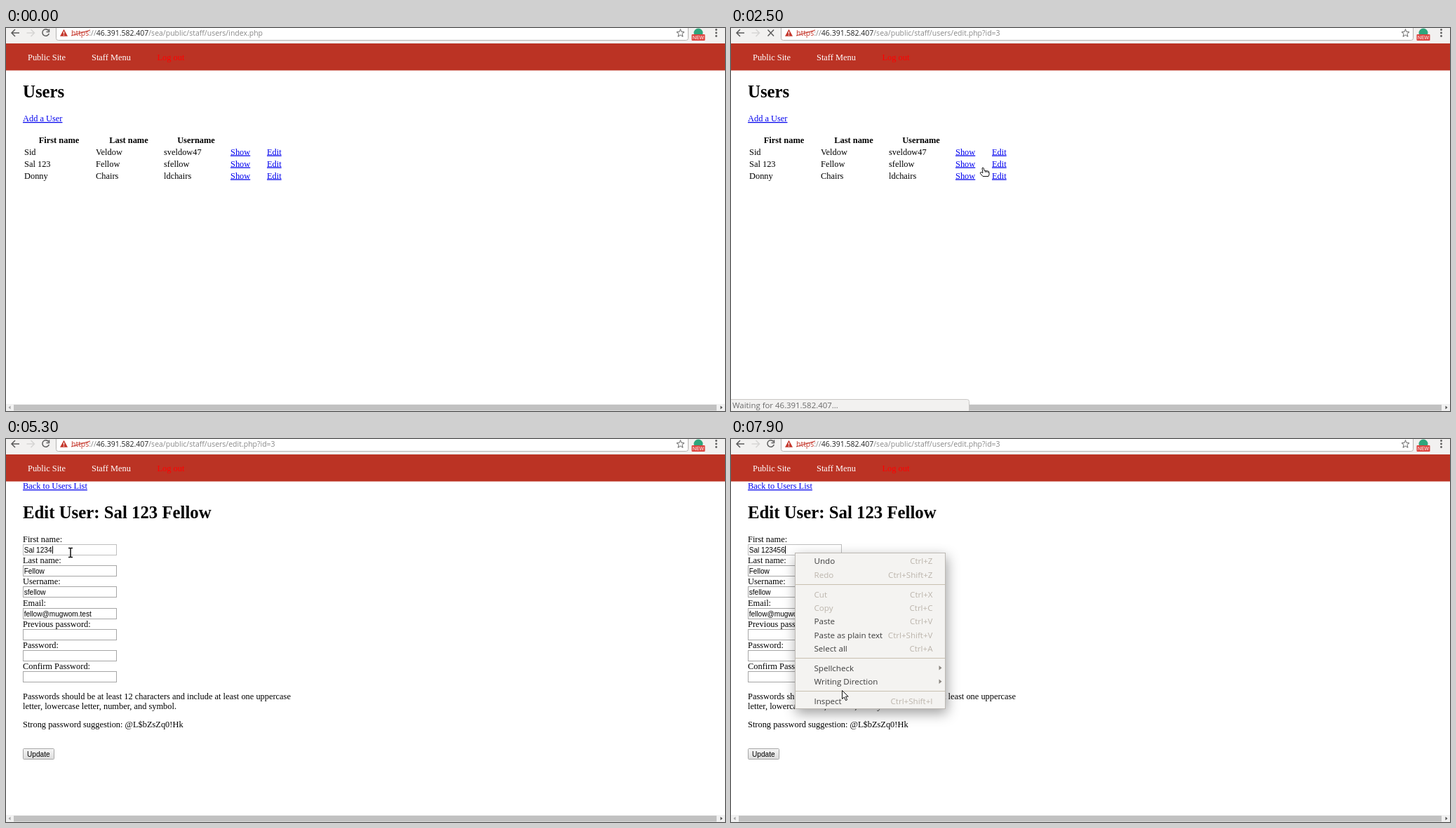
These frames come from a looping animation (1025x546 px, 8 s). An HTML page:

```html
<!DOCTYPE html>
<html lang="en">
<head>
<meta charset="utf-8">
<title>Edit user</title>
<style>
  html, body { margin: 0; width: 100%; height: 100%; overflow: hidden; background: #fff; }
  svg { display: block; }
  text { font: 12.4px "Liberation Serif", serif; white-space: pre; }
  .b { font-weight: bold; }
  .h { font-weight: bold; font-size: 24.8px; }
  .link { fill: #0000ee; text-decoration: underline; }
  .sans { font: 10.1px "Liberation Sans", sans-serif; }
  .url { font: 10.5px "Open Sans", sans-serif; }
  .status { font: 11.4px "Open Sans", sans-serif; fill: #6a6a6a; }
  .menu { font: 11.6px "Open Sans", sans-serif; fill: #3c3c3c; }
  .menu.dim { fill: #bcb5ac; }
  .menu.on { fill: #fff; }
  #menu { filter: drop-shadow(2px 6px 9px rgba(0, 0, 0, .38)); }
  .cur { fill: #fff; stroke: #111; stroke-width: 1; stroke-linejoin: round; }
</style>
</head>
<body>
<svg id="stage" width="1025" height="546" viewBox="0 0 1025 546">
  <defs>
    <linearGradient id="btn" x2="0" y2="1"><stop stop-color="#f6f6f6"/><stop offset="1" stop-color="#dcdcdc"/></linearGradient>
  </defs>
  <rect width="1025" height="546" fill="#fff"/>

  <g id="browser">
    <rect width="1025" height="22" fill="#f2f1f0"/>
    <path d="M71.5 -4V14.5Q71.5 17.5 74.5 17.5H969.5Q972.5 17.5 972.5 14.5V-4Z" fill="#fff" stroke="#b4b2b0"/>
    <g fill="none" stroke-width="1.5">
      <path d="M19 7H8.5M13 2L8 7L13 12" stroke="#5c5c5c"/>
      <path d="M29.500 7H40M35.500 2L40.500 7L35.500 12" stroke="#d6d5d4"/>
      <path id="reload" d="M60.500 3.500A4.800 4.800 0 1 0 61.300 8M61.500 1.500V5.500H57.500" stroke="#5c5c5c"/>
      <path id="stop" d="M52.500 2.500L61 11.500M61 2.500L52.500 11.500" stroke="#5c5c5c"/>
    </g>
    <path d="M82.500 1.800L88 11.800H77Z" fill="#c5372c"/>
    <path d="M82.500 5V8.500M82.500 9.500V10.700" stroke="#fff" stroke-width="1.200"/>
    <path d="M961.500 1.600L963 5.500L967 5.700L963.900 8.300L965 12.300L961.500 10L958 12.300L959.100 8.300L956 5.700L960 5.500Z" fill="none" stroke="#666"/>
    <circle cx="987" cy="7" r="6.500" fill="#2fa67c"/>
    <rect x="977.500" y="9" width="19" height="9" rx="1" fill="#de4440"/>
    <text class="sans" x="987" y="16" text-anchor="middle" fill="#fff" style="font-size:7px">NEW</text>
    <g fill="#5c5c5c"><circle cx="1012.500" cy="2.500" r="1.400"/><circle cx="1012.500" cy="7" r="1.400"/><circle cx="1012.500" cy="11.500" r="1.400"/></g>
    <rect y="22" width="1025" height="38.500" fill="#bb3324"/>
    <rect y="536" width="1025" height="10" fill="#f1f1f1"/>
    <rect x="11" y="537" width="1002" height="8.500" fill="#c1c1c1"/>
    <path d="M6.500 538.500V543.500L3.500 541Z" fill="#a3a3a3"/>
    <path d="M1018.500 538.500V543.500L1021.500 541Z" fill="#505050"/>
  </g>
  <g id="list"></g>
  <g id="form"></g>
  <g id="status">
    <path d="M-1 547V529.500H336.500Q339.500 529.500 339.500 532.500V547Z" fill="#f2f1f0" stroke="#c9c7c5"/>
  </g>
  <g id="menu"></g>

  <g id="arrow" class="cur"><path d="M.5 .5V12.500L3.400 9.900L5.500 14.700L7.600 13.800L5.500 9.100H9.200Z"/></g>
  <g id="hand" class="cur"><path d="M-1 .8Q0 -.8 1.200 .8L2.200 4.500L7.500 5Q9 5.500 9 7V10L8 12.500H0L-3.500 8.500Q-4.200 6.500 -2.300 6.500L0 7.500Z"/><path d="M3.500 5V7M5.500 5V7M7.500 5.500V7.500" stroke-width=".8"/></g>
  <g id="beam" fill="none"><path d="M-3 -6.500H-.7L0 -6L.7 -6.500H3M0 -6V6M-3 6.500H-.7L0 6L.7 6.500H3" stroke="#111" stroke-width="1.500"/></g>
</svg>
<script>
const NS = 'http://www.w3.org/2000/svg';
const $ = id => document.getElementById(id);

function add(parent, tag, attrs, str) {
  const el = document.createElementNS(NS, tag);
  for (const k in attrs) el.setAttribute(k, attrs[k]);
  if (str !== undefined) el.textContent = str;
  parent.appendChild(el);
  return el;
}
const label = (parent, x, y, str, cls = '', anchor = 'start') =>
  add(parent, 'text', { x, y, class: cls, 'text-anchor': anchor }, str);
const show = (el, on) => { el.style.display = on ? '' : 'none'; };

// Browser chrome
const HOST = '46.391.582.407', DIR = '/sea/public/staff/users/';
const chrome = $('browser'), list = $('list'), form = $('form'), menu = $('menu');
const address = label(chrome, 93, 11, '', 'url');
add(address, 'tspan', { fill: '#c5372c' }, 'https');
add(address, 'tspan', { fill: '#888' }, '://');
add(address, 'tspan', { fill: '#222' }, HOST);
const path = add(address, 'tspan', { fill: '#888' });
add(chrome, 'path', { d: 'M93 11L120 3', stroke: '#c5372c', 'stroke-width': 1.2 });
[[31, 'Public Site', '#fff'], [122, 'Staff Menu', '#fff'], [215.5, 'Log out', '#f00']]
  .forEach(([x, s, fill]) => label(chrome, x, 46, s).setAttribute('fill', fill));

// User list
label(list, 24, 99, 'Users', 'h');
label(list, 24, 133, 'Add a User', 'link');
[[75.5, 'First name'], [175, 'Last name'], [271, 'Username']]
  .forEach(([x, s]) => label(list, x, 163.5, s, 'b', 'middle'));
[['Sid', 'Veldow', 'sveldow47'], ['Sal 123', 'Fellow', 'sfellow'], ['Donny', 'Chairs', 'ldchairs']]
  .forEach((row, i) => [...row, 'Show', 'Edit'].forEach((s, c) =>
    label(list, [26, 128, 225, 320, 372][c], 180.5 + 17 * i, s, c > 2 ? 'link' : '')));

// Edit form
label(form, 24, 71, 'Back to Users List', 'link');
label(form, 24, 113, 'Edit User: Sal 123 Fellow', 'h');
const fields = [['First name:', 'Sal 123'], ['Last name:', 'Fellow'], ['Username:', 'sfellow'],
  ['Email:', 'fellow@mugwom.test'], ['Previous password:', ''], ['Password:', ''], ['Confirm Password:', '']]
  .map(([name, value], i) => {
    const y = Math.round(30.2 * i);
    label(form, 24, 147 + y, name);
    const box = add(form, 'rect', { x: 24.5, y: 150.5 + y, width: 133, height: 15, fill: '#fff', stroke: '#a6a6a6' });
    return { box, text: label(form, 25.7, 162 + y, value, 'sans') };
  });
const first = fields[0];
const caret = add(form, 'rect', { y: 152.5, width: 1, height: 11, fill: '#000' });
label(form, 24, 371, 'Passwords should be at least 12 characters and include at least one uppercase');
label(form, 24, 385, 'letter, lowercase letter, number, and symbol.');
label(form, 24, 411, 'Strong password suggestion: @L$bZsZq0!Hk');
add(form, 'rect', { x: 24.5, y: 441.5, width: 44, height: 15, rx: 1, fill: 'url(#btn)', stroke: '#a6a6a6' });
label(form, 30, 452.5, 'Update', 'sans');

const statusText = label($('status'), 2, 542, '', 'status');

// Context menu: y centre, name, shortcut, disabled
add(menu, 'rect', { x: 91.5, y: 162.5, width: 214, height: 222, fill: '#f4f3f1', stroke: '#bdb9b4' });
[207.5, 312.5, 359.5].forEach(y => add(menu, 'path', { d: `M92 ${y}H305`, stroke: '#c8c0b0' }));
const items = [[174, 'Undo', 'Ctrl+Z'], [193.5, 'Redo', 'Ctrl+Shift+Z', 1], [221.5, 'Cut', 'Ctrl+X', 1],
  [241, 'Copy', 'Ctrl+C', 1], [260, 'Paste', 'Ctrl+V'], [279.5, 'Paste as plain text', 'Ctrl+Shift+V'],
  [299, 'Select all', 'Ctrl+A'], [326.5, 'Spellcheck'], [346, 'Writing Direction'], [374, 'Inspect', 'Ctrl+Shift+I']]
  .map(([y, name, keys, off]) => {
    const bar = add(menu, 'rect', { x: 92, y: y - 9.5, width: 213, height: 19, fill: '#f07746' });
    const text = label(menu, 118.5, y + 4, name, off ? 'menu dim' : 'menu');
    if (keys) label(menu, 287.5, y + 4, keys, 'menu dim', 'end');
    else add(menu, 'path', { d: `M296.500 ${y - 3.5}V${y + 3}L300.500 ${y - .2}Z`, fill: '#8a8680' });
    return { y, bar, text, off };
  });

// Pointer: time, x, y, shape from that time on
const track = [
  [300, 20, 27, 'arrow'], [600, 76, 150, 'arrow'], [800, 135, 217, 'arrow'], [1000, 240, 205, 'arrow'],
  [1100, 283, 194, 'beam'], [1200, 298, 188, 'arrow'], [1300, 318, 184, 'hand'], [1500, 354, 183, 'arrow'],
  [1700, 374, 191, 'hand'], [1800, 376, 195, 'hand'], [2100, 376, 195, 'hand'], [2200, 377, 197, 'hand'],
  [2400, 377, 197, 'hand'], [2600, 340, 200, 'hand'], [3000, 168, 215, 'hand'], [3200, 118, 186, 'arrow'],
  [3400, 96, 164, 'beam'], [3500, 93, 161, 'beam'], [3800, 92, 162, 'beam'], [6800, 92, 162, 'beam'],
  [6900, 90, 161, 'arrow'], [7200, 90, 161, 'arrow'], [7300, 92, 166, 'arrow'], [7500, 110, 215, 'arrow'],
  [7700, 140, 305, 'arrow'], [7900, 158, 358, 'arrow']
];

function pointer(t) {
  let i = track.length - 1;
  while (i >= 0 && track[i][0] > t) i--;
  if (i < 0) return null;
  const a = track[i], b = track[i + 1] || a;
  const k = b === a ? 0 : (t - a[0]) / (b[0] - a[0]);
  return { x: a[1] + (b[1] - a[1]) * k, y: a[2] + (b[2] - a[2]) * k, shape: a[3] };
}

function draw(t) {
  const loading = t >= 2200 && t < 3200, editing = t >= 3200;
  path.textContent = DIR + (t < 2200 ? 'index.php' : 'edit.php?id=3');
  show($('reload'), !loading);
  show($('stop'), loading);
  show(list, !editing);
  show(form, editing);

  const fade = t < 3400 ? 1 : Math.max(0, .45 - (t - 3400) * .003);
  show($('status'), t >= 2000 && fade > 0);
  $('status').style.opacity = fade;
  statusText.textContent = t < 2500 ? `https://${HOST}${DIR}edit.php?id=3` : `Waiting for ${HOST}…`;

  const typed = [5300, 5500, 6300].filter(at => t >= at).length;
  first.text.textContent = 'Sal 123' + '456'.slice(0, typed);
  first.box.setAttribute('stroke', t < 4100 ? '#a6a6a6' : '#bfbfbf');
  show(caret, t >= 4100);
  if (editing) caret.setAttribute('x', Math.round(25.7 + first.text.getComputedTextLength()));

  const p = pointer(t);
  show(menu, t >= 6900);
  menu.style.opacity = t < 7000 ? .6 : 1;
  for (const it of items) {
    const on = t >= 7300 && !it.off && Math.abs(p.y - it.y) < 9.5;
    show(it.bar, on);
    it.text.classList.toggle('on', on);
  }
  for (const name of ['arrow', 'hand', 'beam']) {
    const on = p && p.shape === name;
    show($(name), on);
    if (on) $(name).setAttribute('transform', `translate(${Math.round(p.x)} ${Math.round(p.y)})`);
  }
}

const start = performance.now();
function tick() {
  draw(Math.floor((performance.now() - start) % 8000 / 100) * 100);
  requestAnimationFrame(tick);
}
tick();
</script>
</body>
</html>
```
